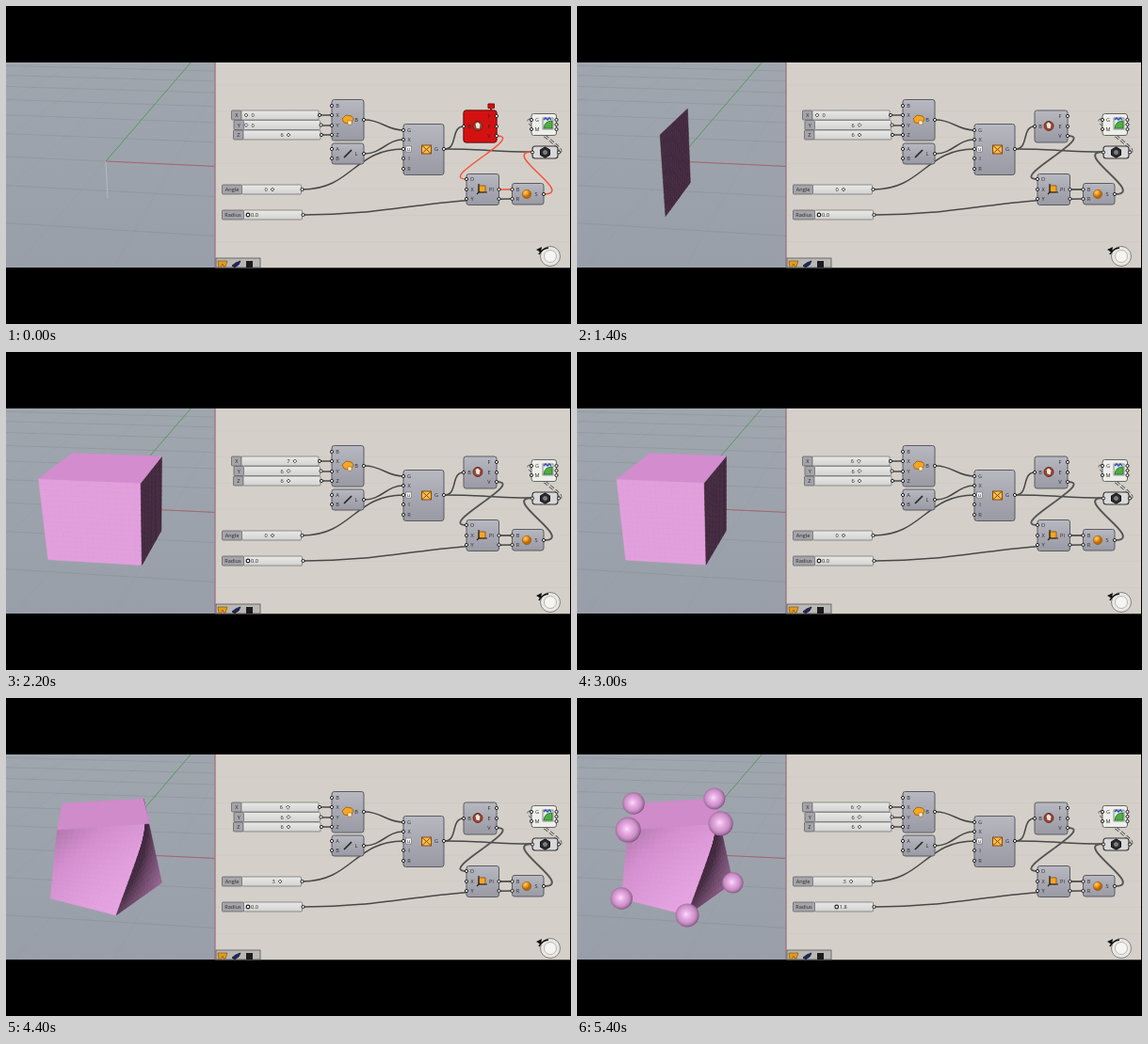
These frames come from a looping animation (600 px wide and 338 px high, 5.6 s). An HTML page with a canvas:

```html
<!DOCTYPE html>
<html lang="en">
<head>
<meta charset="utf-8">
<title>Twisted box node graph</title>
<style>
html, body { margin: 0; width: 100%; height: 100%; overflow: hidden; background: #000; }
canvas { position: absolute; left: 0; top: 60px; width: 222px; height: 218px; }
svg { position: absolute; left: 0; top: 0; }
text { font: 5.6px "Open Sans", "DejaVu Sans", sans-serif; fill: #2a2a2a; text-anchor: middle; }
.wire { fill: none; stroke: #484848; stroke-width: 1.5; }
.late { stroke: #555; stroke-width: 1.9; }
.empty .late { stroke: #f4533a; stroke-width: 1.5; }
.fault { fill: #d41111; stroke: #7c0808; display: none; }
.empty .fault { display: inline; }
</style>
</head>
<body>
<canvas></canvas>
<svg width="600" height="338" viewBox="0 0 600 338">
  <defs>
    <linearGradient id="metal" x2="0" y2="1">
      <stop stop-color="#b8b8c1"/><stop offset=".5" stop-color="#a8a8b2"/><stop offset="1" stop-color="#9a9aa5"/>
    </linearGradient>
    <linearGradient id="track" x2="0" y2="1">
      <stop stop-color="#e9e9e7"/><stop offset="1" stop-color="#d2d2d0"/>
    </linearGradient>
    <radialGradient id="gold" cx=".35" cy=".3">
      <stop stop-color="#ffd070"/><stop offset=".5" stop-color="#f5a21c"/><stop offset="1" stop-color="#b8690c"/>
    </radialGradient>
  </defs>
</svg>
<script>
const STEP = 200, LOOP = 5600;
// Values change in hard steps; missing tail entries keep the last value.
const track = {
  y: [0, 0, 1, 2, 4, 5, 6],
  x: [0, 0, 0, 0, 0, 0, 0, 0, 2, 4, 6, 7, 7, 6],
  angle: [0, 0, 0, 0, 0, 0, 0, 0, 0, 0, 0, 0, 0, 0, 0, 0, 1, 1, 2, 2, 3],
};
const radiusSteps = [0.6, 1.6, 2.4, 2.1, 1.8], ballSteps = [0.3, 1, 1.63, 1.2, 0.82];
const at = (list, i) => list[Math.min(i, list.length - 1)];

// ---- Node graph ----
const svg = document.querySelector('svg');
function add(tag, attrs, label) {
  const el = document.createElementNS('http://www.w3.org/2000/svg', tag);
  for (const k in attrs) el.setAttribute(k, attrs[k]);
  if (label !== undefined) el.textContent = label;
  return svg.appendChild(el);
}
const rect = (x, y, width, height, fill, more) => add('rect', { x, y, width, height, fill, ...more });
const path = (d, fill, stroke = 'none', more) => add('path', { d, fill, stroke, ...more });
const circle = (cx, cy, r, fill, more) => add('circle', { cx, cy, r, fill, ...more });
const text = (x, y, label) => add('text', { x, y: y + 2 }, label);
const port = (x, y) => circle(x, y, 1.6, '#f6f6f6', { stroke: '#222', 'stroke-width': 1 });

function wire(x1, y1, x2, y2, bend, cls = '') {
  return add('path', { class: 'wire ' + cls, d: `M${x1} ${y1}C${x1 + bend} ${y1} ${x2 - bend} ${y2} ${x2} ${y2}` });
}

function node(x, y, w, h, ins, outs, cls) {
  rect(x, y, w, h, 'url(#metal)', { rx: 2.5, stroke: '#5b5b62', 'stroke-width': 1 });
  if (cls) rect(x, y, w, h, '', { rx: 2.5, class: cls });
  const rows = (list, px, tx) => list.forEach(([name, py]) => { port(px, py); text(tx, py, name); });
  rows(ins, x, x + 6);
  rows(outs, x + w, x + w - 8);
}

function slider(name, x, y, labelW, trackW, start, unit, round, flip) {
  const tx = x + labelW;
  rect(x, y, labelW, 10, '#a4a4aa', { stroke: '#666', 'stroke-width': .8, rx: 1 });
  text(x + labelW / 2, y + 5, name);
  rect(tx, y, trackW, 10, 'url(#track)', { stroke: '#777', 'stroke-width': .8, rx: 1 });
  port(tx + trackW + 1, y + 5);
  const shape = round ? 'M-1.8 0a1.8 1.8 0 1 0 3.6 0a1.8 1.8 0 1 0 -3.6 0' : 'M-1.9 0L0 -1.9L1.9 0L0 1.9Z';
  const knob = path(shape, '#fff', '#222', { 'stroke-width': round ? 1.2 : .8 });
  const value = text(0, y + 5, '');
  return v => {
    const kx = start + unit * v;
    knob.setAttribute('transform', `translate(${kx} ${y + 5})`);
    value.setAttribute('x', kx + (v >= flip ? -7 : 7));
    value.textContent = round ? v.toFixed(1) : v;
  };
}

rect(222, 60, 377, 218, '#d4d0c9');
for (let y = 84; y < 278; y += 27.7) path(`M222 ${y}H599`, 'none', '#cdc9c2', { 'stroke-width': .7 });
rect(221.4, 60, 1.2, 218, '#9a6e7c');

wire(333, 116, 346, 116, 5);
wire(335, 127, 346, 127, 5);
wire(335, 137, 346, 137, 5);
wire(381, 121, 422, 132, 18);
wire(381, 157, 422, 142, 18);
wire(315, 195, 422, 152, 52);
wire(317, 222, 537, 205, 90);
wire(466, 152, 486, 128, 14);
wire(466, 152, 559, 155, 40);
wire(521, 138, 489, 184, 32, 'late');
wire(523, 195, 537, 195, 6, 'late');
wire(571, 200, 559, 155, 35, 'late');
const dash = wire(587, 155, 557, 121, 13);
dash.setAttribute('stroke-dasharray', '5 2');
dash.style.strokeWidth = 3;
wire(587, 155, 557, 121, 13).style.stroke = '#d4d0c9';

const setX = slider('X', 239.5, 111, 10.5, 82, 255, 7.4, false, 5);
const setY = slider('Y', 242, 121.5, 10.5, 81, 255, 7.5, false, 5);
const setZ = slider('Z', 241.5, 132, 10.5, 82, 255, 7.5, false, 5);
const setAngle = slider('Angle', 229.5, 190, 21, 63, 283, 2.7, false, 0);
const setRadius = slider('Radius', 229.5, 217, 23, 62, 257, 10.4, true, 5);
setZ(6);

node(346, 99.5, 34, 43.5, [['B', 106], ['X', 116], ['Y', 127], ['Z', 137]], [['B', 121]]);
path('M357 120l4 -4l6 1l2 3l-3 5l-7 -1Z', '#f5a623', '#9a5a0a', { 'stroke-width': .8 });
path('M363 122h4v4h-4z', '#fff0cc', '#b06c10', { 'stroke-width': .6 });

node(346, 146, 34, 22, [['A', 152], ['B', 162]], [['L', 157]]);
path('M359 161L367 153', 'none', '#25252b', { 'stroke-width': 1.7 });

node(422, 125.5, 43, 54, [['G', 132], ['X', 142], ['A', 152], ['I', 162], ['R', 173]], [['G', 152]]);
rect(424.5, 149, 6, 6, '#f2f2f2', { stroke: '#666', 'stroke-width': .6 });
text(427.5, 152, 'u');
path('M441.5 148h10v9h-10zl10 9m0 -9l-10 9', '#f8c04e', '#8c4a0a', { 'stroke-width': 1 });

node(486, 111, 35, 34, [['B', 128]], [['F', 117], ['E', 128], ['V', 138]], 'fault');
circle(501, 127.5, 5, '#b8432e', { stroke: '#4a2018', 'stroke-width': .8 });
path('M498 125l3 -2l3 3l-1 5l-4 -1Z', '#f2e5d8', '#5a2a1c', { 'stroke-width': .7 });
path('M512 104h6.5v4.5h-2l-1.5 2l-1 -2h-2Z', '', 'none', { class: 'fault' });

node(489, 178.5, 34.5, 33, [['O', 184], ['X', 195], ['Y', 205]], [['Pl', 195]]);
port(523.5, 205);
path('M502 191h7v7h-7z', '#f5a623', '#8c4a0a', { 'stroke-width': .8 });
path('M502 189v9h9M500 200l3 -3', 'none', '#222', { 'stroke-width': 1.2 });

node(537.5, 188.5, 33.5, 22.5, [['B', 195], ['R', 205]], [['S', 200]]);
circle(553, 200, 4.7, 'url(#gold)', { stroke: '#8c4a0a', 'stroke-width': .5 });

rect(558, 114.5, 26.5, 23, '#eeeeea', { rx: 2.5, stroke: '#666', 'stroke-width': 1 });
[['G', 121], ['M', 131]].forEach(([name, y]) => { port(558, y); text(564, y, name); });
[121, 126, 131].forEach(y => port(584.5, y));
rect(570, 119, 11, 12, '#dfe9df', { stroke: '#555', 'stroke-width': .6 });
path('M571 130q1 -8 9 -8v8Z', '#4fae45', '#1f6c22', { 'stroke-width': .8 });
path('M571 121l2 -2l2 2l2 -2l2 2', 'none', '#2f45c0', { 'stroke-width': 1.3 });

rect(559, 149, 27, 13, '#d8d8da', { rx: 3, stroke: '#333', 'stroke-width': 1.1 });
port(559, 155.5);
port(587, 155.5);
path('M572.5 150l5 2.8v5.6l-5 2.8l-5 -2.8v-5.6Z', '#2c2c2f', '#111');
circle(572.5, 155.6, 2, '#77777b', { stroke: '#bbb', 'stroke-width': .5 });

rect(223, 268, 47, 10, '#b9b8b4', { stroke: '#555', 'stroke-width': .8 });
path('M225 271h10l-2 6h-2l-1 -3l-2 4h-2Z', '#e79a18', '#6e4706', { 'stroke-width': .6 });
path('M240 276l4 -3l5 -2l-2 4l-3 2l-1 1Z', '#22264f', '#22264f');
rect(255, 271, 7, 7, '#1c1c1e');

circle(578, 266, 10.5, '#e9e8e4', { stroke: '#85837e', 'stroke-width': 1 });
circle(578, 266, 6.5, '#f6f5f2', { stroke: '#aaa8a2', 'stroke-width': .8 });
path('M566 264q3 -6 10 -7', 'none', '#111', { 'stroke-width': 1.6 });
path('M563 259l6 -3l-1 6Z', '#111');

// ---- 3D viewport ----
const canvas = document.querySelector('canvas'), g = canvas.getContext('2d');
const dpr = window.devicePixelRatio || 1;
canvas.width = 222 * dpr;
canvas.height = 218 * dpr;
g.setTransform(dpr, 0, 0, dpr, 0, -60 * dpr);
g.lineJoin = 'round';

function project([x, y, z]) {
  const w = 1 - .003 * x + .022 * y - .0137 * z;
  return [106 + (13.9 * x + 4.6 * y - .7 * z) / w, 165 + (.65 * x - 5.35 * y - 13.7 * z) / w, w];
}

function line(a, b, color, width = 1) {
  const p = project(a), q = project(b);
  g.beginPath();
  g.moveTo(p[0], p[1]);
  g.lineTo(q[0], q[1]);
  g.strokeStyle = color;
  g.lineWidth = width;
  g.stroke();
}

function ground() {
  const sky = g.createLinearGradient(0, 60, 0, 278);
  sky.addColorStop(0, '#a0a6ae');
  sky.addColorStop(1, '#999fa9');
  g.fillStyle = sky;
  g.fillRect(0, 60, 222, 218);
  for (let k = -80; k <= 80; k += 5) {
    if (k >= -20) line([-80, k, 0], [80, k, 0], 'rgba(85,95,106,.2)', .8);
    line([k, -20, 0], [k, 80, 0], 'rgba(85,95,106,.06)', .8);
  }
  line([0, 0, 0], [0, 80, 0], '#4f9a55', .9);
  line([0, 0, 0], [40, 0, 0], '#a9606c', .9);
}

const ramp = [[0, 66, 40, 62], [.3, 152, 102, 147], [.56, 212, 142, 207], [.8, 230, 164, 226], [1.2, 240, 182, 237]];
function pink(s) {
  s = Math.max(0, Math.min(1.19, s));
  const i = ramp.findIndex(r => r[0] > s), a = ramp[i - 1], b = ramp[i];
  const k = (s - a[0]) / (b[0] - a[0]);
  return `rgb(${[1, 2, 3].map(c => Math.round(a[c] + (b[c] - a[c]) * k))})`;
}

const sub = (a, b) => a.map((v, i) => v - b[i]);
const mix = (a, b, k) => a.map((v, i) => v + (b[i] - v) * k);
const cross = (a, b) => [a[1] * b[2] - a[2] * b[1], a[2] * b[0] - a[0] * b[2], a[0] * b[1] - a[1] * b[0]];

// Softness pulls the directional light towards an even middle tone.
function quad(pts, soft) {
  const p = pts.map(project);
  const e = sub(p[1], p[0]), f = sub(p[3], p[0]);
  if (e[0] * f[1] - e[1] * f[0] > -1e-6) return;
  const n = cross(sub(pts[1], pts[0]), sub(pts[3], pts[0]));
  const light = (-.3 * n[0] - .77 * n[1] + .56 * n[2]) / Math.hypot(...n);
  g.beginPath();
  p.forEach(([x, y]) => g.lineTo(x, y));
  g.closePath();
  g.fillStyle = g.strokeStyle = pink(light * (1 - soft) + soft / 2);
  g.lineWidth = .5;
  g.fill();
  g.stroke();
}

// Straight edges join the two turned ends, so each side is a ruled surface.
function solid(sx, sy, twist) {
  const end = h => [[-1, -1], [1, -1], [1, 1], [-1, 1]].map(([u, v]) => {
    const x = u * sx / 2, y = v * sy / 2, c = Math.cos(twist * h), s = Math.sin(twist * h);
    return [x * c - y * s, x * s + y * c, 3 * h];
  });
  const low = end(-1), high = end(1), n = 16;
  const soft = .1 + 2 * Math.max(0, twist - .2);
  [3, 2, 0, 1].forEach(a => {
    const b = (a + 1) % 4;
    const spot = (i, j) => mix(mix(low[a], low[b], i / n), mix(high[a], high[b], i / n), j / n);
    for (let i = 0; i < n; i++) for (let j = 0; j < n; j++) {
      quad([spot(i, j), spot(i + 1, j), spot(i + 1, j + 1), spot(i, j + 1)], soft);
    }
  });
  quad(high, soft);
  return [...low, ...high];
}

function ball(p, radius) {
  const [x, y, w] = project(p), r = radius * 14.5 / w;
  const shade = g.createRadialGradient(x - r * .1, y - r * .08, 0, x - r * .05, y - r * .05, r * 1.06);
  [[0, '#fbe2f9'], [.14, '#f3c6f0'], [.4, '#e2a8de'], [.7, '#cc90c8'], [.9, '#a46fa0'], [1, '#7c5178']]
    .forEach(([k, c]) => shade.addColorStop(k, c));
  g.fillStyle = shade;
  g.beginPath();
  g.arc(x, y, r, 0, 2 * Math.PI);
  g.fill();
}

function show(i) {
  const x = at(track.x, i), y = at(track.y, i), angle = at(track.angle, i);
  const grown = i >= 23;
  setX(x);
  setY(y);
  setAngle(angle);
  setRadius(grown ? radiusSteps[i - 23] : 0);
  svg.classList.toggle('empty', y === 0);
  ground();
  if (y === 0) return line([0, 0, 0], [0, 0, -3], 'rgba(215,219,224,.5)', .8);
  const pts = solid(x, y, angle * .11);
  if (!grown) return;
  const hidden = 3;
  pts.filter((p, k) => k !== hidden)
    .sort((a, b) => project(b)[2] - project(a)[2])
    .forEach(p => ball(p, ballSteps[i - 23]));
}

let shown = -1;
const begin = performance.now();
function tick(now) {
  const i = Math.floor(Math.max(0, now - begin) % LOOP / STEP);
  if (i !== shown) show(shown = i);
  requestAnimationFrame(tick);
}
tick(begin);
</script>
</body>
</html>
```
